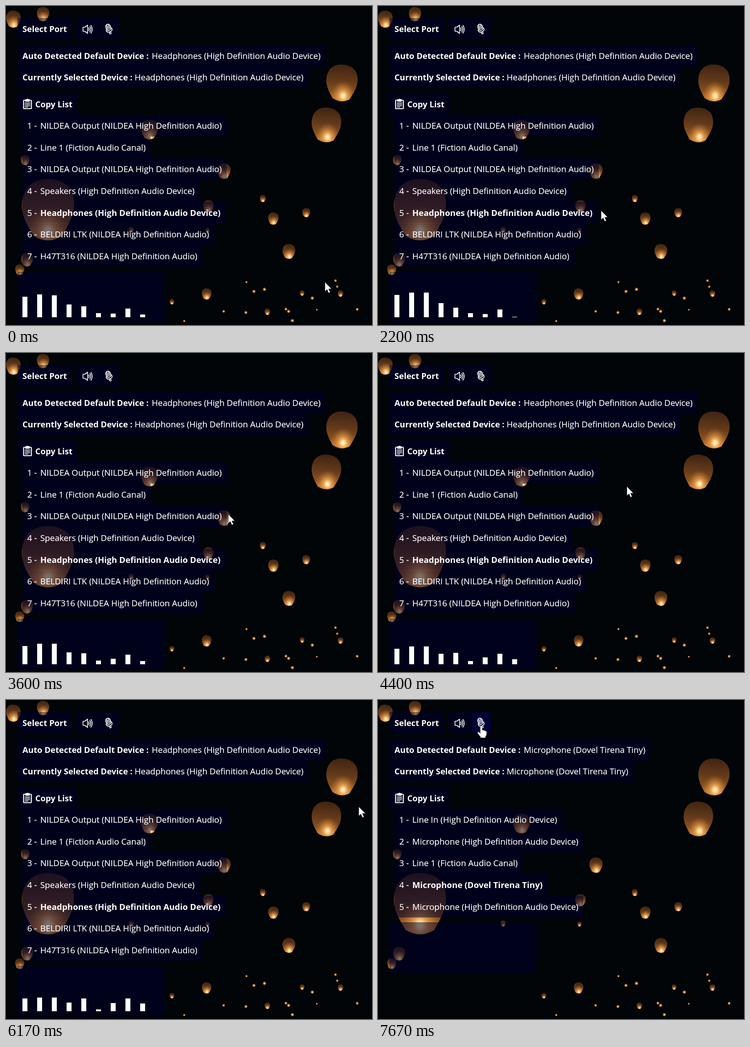
Write an HTML page with a canvas that moves like this. It is 801 by 699 pixels and loops after 8000 ms.

```html
<!DOCTYPE html>
<html lang="en">
<head>
<meta charset="utf-8">
<title>Select Port</title>
<style>
  html, body { margin: 0; width: 100%; height: 100%; overflow: hidden; background: #010508; }
  canvas, svg { position: absolute; left: 0; top: 0; display: block; }
  text { font: 18.4px "Open Sans", "Noto Sans", sans-serif; fill: #fff; stroke: #fff; stroke-width: .2; white-space: pre; }
  .bold { font-weight: 700; stroke: none; }
  .head { font-size: 18.1px; }
  .panel { fill: rgba(0, 0, 44, .53); }
  .hot { fill: rgba(0, 0, 70, .68); }
  .bar { fill: #fff; }
  .icon { fill: none; stroke: #fff; stroke-width: 1.7; stroke-linecap: round; stroke-linejoin: round; }
  .pointer { fill: #fff; stroke: #10121a; stroke-width: .8; stroke-linejoin: round; }
</style>
</head>
<body>
<canvas id="photo" width="801" height="699"></canvas>
<svg id="ui" width="801" height="699" viewBox="0 0 801 699">
  <g id="panels"></g>
  <g class="icon">
    <path d="M168.500 46.500h4l6-4.500v18l-6-4.500h-4z"/>
    <path d="M181 48q2 3 0 6M183.500 45q4 6 0 12M186 42.500q5.500 8.500 0 17"/>
  </g>
  <g class="icon" transform="translate(225 50) rotate(-20)">
    <rect x="-5" y="-10.500" width="10" height="14" rx="5"/>
    <path stroke-width="1.1" d="M-4-6.500h8M-4.500-4h9M-4.500-1.500h9M-1.700-9.500v11M1.700-9.500v11"/>
    <path d="M-6.500 0v2q0 5 6.500 5t6.500-5v-2M-1.500 7v4.500h3v-4.500"/>
  </g>
  <g class="icon">
    <rect x="38.500" y="206.500" width="17" height="18.500" rx="1.500" stroke-width="2.200"/>
    <path fill="#fff" d="M43 205h2.500q1.500-2 3 0h2.500v4h-8z"/>
    <path d="M42 212.500h10M42 215.500h10M42 218.500h10M42 221.500h6"/>
  </g>
  <g id="meter"></g>
  <g id="tip">
    <path id="arrow" class="pointer" d="M.5 0V20.500L5.200 16.300L8.500 24L12 22.500L8.700 15H15z"/>
    <path id="hand" class="pointer" d="M-2.300 1Q0-2.500 2.200 1V9Q4.500 7.500 6 9.800Q8.300 8.700 9.300 11
      Q11.800 10.500 12 13.500V18Q11.500 21 9.500 23V26H-2V23.500Q-5 20-8 15.500Q-9 12.500-5.500 13L-2.300 16z"/>
  </g>
</svg>
<script>
const LOOP = 8000, SWITCH = 7670;
const get = id => document.getElementById(id);

// ---- night sky with lanterns ----
const ctx = get('photo').getContext('2d');

// x, y, width; the height follows
const lanterns = [
  [735, 169, 69], [701, 261, 65], [92, 447, 115], [16, 29, 32], [81, 18, 27],
  [314, 271, 37], [477, 362, 29], [42, 338, 19], [443, 439, 23], [46, 556, 26],
  [30, 578, 20], [619, 538, 28], [585, 466, 23], [439, 631, 21], [657, 453, 17],
  [562, 422, 13], [648, 629, 10], [732, 630, 12], [572, 670, 12], [363, 648, 10],
  [274, 490, 11], [441, 491, 9]
];

const outline = new Path2D('M-.27 .42C-.42 .22-.53 .05-.49-.16C-.43-.42-.22-.5 0-.5' +
  'C.25-.5 .46-.4 .49-.16C.52 .05 .4 .22 .27 .42Q0 .56-.27 .42Z');

function paint(gradient, stops) {
  stops.forEach(([at, color]) => gradient.addColorStop(at, color));
  ctx.fillStyle = gradient;
  ctx.fillRect(-1, -1, 2, 2);
}

function lantern([x, y, w]) {
  const fx = w < 100 ? .06 : 0;
  ctx.save();
  ctx.translate(x, y);
  ctx.scale(w, w * 1.18);
  ctx.rotate(fx);
  ctx.clip(outline);
  paint(ctx.createLinearGradient(0, -.5, 0, .5),
    [[0, '#3f2412'], [.45, '#633a1a'], [.75, '#87511f'], [.92, '#b8722e'], [1, '#7a4519']]);
  paint(ctx.createRadialGradient(fx, .34, 0, fx, .34, w < 50 ? .55 : .4),
    [[0, '#fff6de'], [.14, '#ffe0a0'], [.35, 'rgba(250,178,90,.75)'], [1, 'rgba(200,115,45,0)']]);
  ctx.restore();
}

function spark(x, y, r) {
  ctx.save();
  ctx.translate(x, y);
  ctx.scale(r, r);
  paint(ctx.createRadialGradient(0, .1, 0, 0, 0, 1),
    [[0, '#ffe8b8'], [.4, '#e09a48'], [.7, 'rgba(150,80,30,.6)'], [1, 'rgba(80,40,12,0)']]);
  ctx.restore();
}

function paintPhoto() {
  let seed = 7;
  const rand = (lo, hi) => lo + (seed = seed * 16807 % 2147483647) / 2147483647 * (hi - lo);
  ctx.fillStyle = '#010508';
  ctx.fillRect(0, 0, 801, 699);
  for (let i = 0; i < 14; i++) spark(rand(390, 800), rand(588, 699), rand(2.5, 5));
  lanterns.forEach(lantern);
}

// ---- interface ----
const ROW = 47.6, PAD = 10.7, LEFT = 25.3, LIST_Y = 269.2;
const DEVICE = '(High Definition Audio Device)';
const CARD = '(NILDEA High Definition Audio)';
const CABLE = 'Line 1 (Fiction Audio Canal)';
const MIC = 'Microphone (Dovel Tirena Tiny)';

const outputs = ['NILDEA Output ' + CARD, CABLE, 'NILDEA Output ' + CARD, 'Speakers ' + DEVICE,
  'Headphones ' + DEVICE, 'BELDIRI LTK ' + CARD, 'H47T316 ' + CARD];
const inputs = ['Line In ' + DEVICE, 'Microphone ' + DEVICE, CABLE, MIC, 'Microphone ' + DEVICE];

function add(parent, name, attrs, text = '') {
  const el = document.createElementNS('http://www.w3.org/2000/svg', name);
  Object.entries(attrs).forEach(([k, v]) => el.setAttribute(k, v));
  el.textContent = text;
  return parent.appendChild(el);
}

function panel(parent, x, y, width, height = ROW) {
  return add(parent, 'rect', { class: 'panel', x, y, width, height });
}

// texts on one baseline, with a panel that ends after the last of them
function line(parent, left, y, ...parts) {
  const back = panel(parent, left, y - 30.7, 0);
  parts.forEach(([x, text, style = '']) => {
    const el = add(parent, 'text', { x, y, class: style }, text);
    back.setAttribute('width', x + el.getComputedTextLength() + PAD - left);
  });
  return back;
}

function page(names, chosen) {
  const g = add(get('panels'), 'g', {});
  const device = names[chosen];
  line(g, LEFT, 115.5, [36, 'Auto Detected Default Device :', 'bold head'], [319, device]);
  const current = line(g, LEFT, 163.1, [36, 'Currently Selected Device :', 'bold head'], [281.5, device]);
  const rows = names.map((name, i) => line(g, 36, LIST_Y + i * ROW,
    [46.5, `${i + 1} -`], [75, name, i === chosen ? 'bold' : '']));
  panel(g, LEFT, 249 + names.length * ROW, 321.5, 111);
  return { g, spots: [current, ...rows] };
}

const shared = get('panels');
line(shared, LEFT, 57, [36, 'Select Port', 'bold head']);
line(shared, LEFT, 221.5, [64, 'Copy List', 'bold head']);
panel(shared, 155, 26.3, 49);
const micCell = panel(shared, 204, 26.3, 43);
const outPage = page(outputs, 4);
const inPage = page(inputs, 3);

// ---- motion ----
// time, x, y of the pointer tip at each turn
const path = [
  [0, 697.5, 605], [1460, 697.5, 605], [2200, 488, 448], [2270, 462, 450], [2470, 462, 450],
  [3270, 552, 410], [3600, 486, 353], [3700, 463, 357], [3960, 463, 357], [4770, 612, 238],
  [5070, 546.5, 181.5], [5200, 520, 162], [5460, 520, 162], [6170, 772, 234],
  [6800, 450, 17], [7100, 246, 58], [7330, 226, 57]
];

function pointerAt(t) {
  const i = path.findIndex(p => p[0] > t);
  if (i < 0) return path[path.length - 1].slice(1);
  const [t0, x0, y0] = path[i - 1], [t1, x1, y1] = path[i];
  const k = (t - t0) / (t1 - t0);
  return [x0 + (x1 - x0) * k, y0 + (y1 - y0) * k];
}

// each bar rides one slow swell around its mean, refreshed eight times a second
const mean = [39, 43, 42, 25, 25, 7, 12, 22, 9];
const swing = [12, 12, 12, 7, -3, 2, -6, -5, -8];
const bars = mean.map((_, i) => add(get('meter'), 'rect', { class: 'bar', x: 36 + i * 32.2, width: 10.8 }));

function barHeight(i, t) {
  const beat = Math.floor((t + 25) / 125);
  const swell = Math.cos((beat * 125 - 1500) / 1500);
  return Math.max(1, Math.round(mean[i] + swing[i] * swell + Math.sin(beat * 2.1 + i * 1.7)));
}

const inside = (r, x, y) => x >= r.x && x <= r.x + r.width && y >= r.y && y <= r.y + r.height;
const spots = [micCell, ...outPage.spots].map(el => ({ el, box: el.getBBox() }));
const show = (el, on) => { el.style.display = on ? '' : 'none'; };

function draw(t) {
  const switched = t >= SWITCH;
  show(outPage.g, !switched);
  show(inPage.g, switched);
  show(get('meter'), !switched);

  const [x, y] = pointerAt(t);
  const hit = spots.find(s => inside(s.box, x, y));
  spots.forEach(s => s.el.classList.toggle('hot', s === hit));
  get('tip').setAttribute('transform', `translate(${x} ${y})`);
  show(get('arrow'), !hit);
  show(get('hand'), hit);

  bars.forEach((bar, i) => {
    const h = barHeight(i, t);
    bar.setAttribute('y', 682 - h);
    bar.setAttribute('height', h);
  });
}

paintPhoto();
const start = performance.now();
function tick() {
  draw((performance.now() - start) % LOOP);
  requestAnimationFrame(tick);
}
tick();
</script>
</body>
</html>
```
